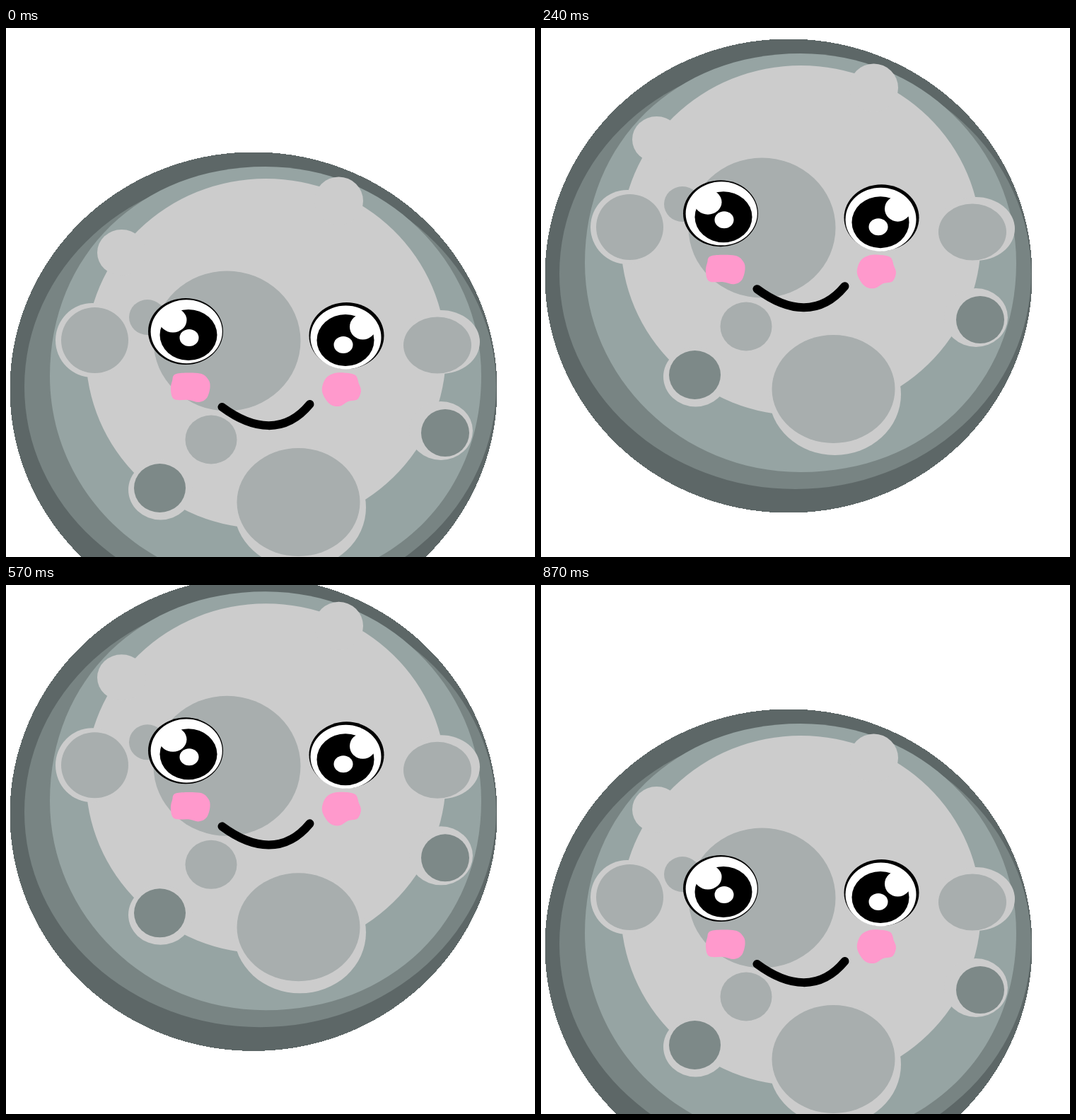
Write an HTML page with a canvas that moves like this. It is 748x748 px and loops after 900 ms.

```html
<!DOCTYPE html>
<html lang="en">
<head>
<meta charset="utf-8">
<title>Bouncing moon</title>
<style>
  html, body { margin: 0; width: 100%; height: 100%; overflow: hidden; background: #fff; }
  canvas { display: block; }
</style>
</head>
<body>
<canvas id="stage" width="748" height="748"></canvas>
<script>
const ctx = document.getElementById('stage').getContext('2d');
const SIZE = 748, STEP = 30, STEPS = 30, PEAK = 14;
const BODY_RISE = 280, FACE_RISE = 292;
const RIM = '#5d6767', SHADE = '#788483', GLOW = '#96a4a3';
const PALE = '#cccccc', CRATER = '#a8aeae', DEEP = '#7d8988', PINK = '#ff99cc';

function oval(color, x, y, rx, ry = rx) {
  ctx.fillStyle = color;
  ctx.beginPath();
  ctx.ellipse(x, y, rx, ry, 0, 0, Math.PI * 2);
  ctx.fill();
}

// Oval built from whole pixel rows, so its edge stays hard
function hardOval(color, x, y, rx, ry) {
  ctx.fillStyle = color;
  const bottom = Math.min(SIZE, Math.ceil(y + ry));
  for (let row = Math.max(0, Math.floor(y - ry)); row < bottom; row++) {
    const nearest = Math.min(Math.max(y, row), row + 1);
    const half = rx * Math.sqrt(Math.max(0, 1 - ((nearest - y) / ry) ** 2));
    const left = Math.floor(x - half);
    ctx.fillRect(left, row, Math.ceil(x + half) - left, 1);
  }
}

// Closed curve passing smoothly through the points
function blob(color, points) {
  const n = points.length, at = i => points[(i + n) % n];
  ctx.fillStyle = color;
  ctx.beginPath();
  ctx.moveTo(...points[0]);
  for (let i = 0; i < n; i++) {
    const [a, b, c, d] = [at(i - 1), at(i), at(i + 1), at(i + 2)];
    ctx.bezierCurveTo(
      b[0] + (c[0] - a[0]) / 6, b[1] + (c[1] - a[1]) / 6,
      c[0] - (d[0] - b[0]) / 6, c[1] - (d[1] - b[1]) / 6, c[0], c[1]);
  }
  ctx.fill();
}

// Oval whose upper left and lower right quarters are slightly fuller
function glow(x, y, rx, ry) {
  const k = 0.5523, f = 0.58;
  ctx.fillStyle = GLOW;
  ctx.beginPath();
  ctx.moveTo(x, y - ry);
  ctx.bezierCurveTo(x + k * rx, y - ry, x + rx, y - k * ry, x + rx, y);
  ctx.bezierCurveTo(x + rx, y + f * ry, x + f * rx, y + ry, x, y + ry);
  ctx.bezierCurveTo(x - k * rx, y + ry, x - rx, y + k * ry, x - rx, y);
  ctx.bezierCurveTo(x - rx, y - f * ry, x - f * rx, y - ry, x, y - ry);
  ctx.fill();
}

function drawMoon() {
  oval(SHADE, 359.5, 347.5, 333.5, 304.5);
  glow(367, 332, 305, 296);

  oval(PALE, 367.5, 300.5, 254.5, 247.5);
  oval(PALE, 470.5, 84.5, 34.5, 34);
  oval(PALE, 163.5, 157.5, 34.5, 32.5);
  oval(PALE, 122, 281.5, 52, 52.5);
  oval(PALE, 615, 284, 55, 45);
  oval(PALE, 615, 409.5, 45, 41.5);
  oval(PALE, 415.5, 518, 93.5, 86);
  oval(PALE, 218.5, 493, 45.5, 42.5);

  oval(CRATER, 312.5, 282.5, 104, 99);
  oval(CRATER, 200, 249, 26, 25);
  oval(CRATER, 125.5, 281.5, 47.5, 46.5);
  oval(CRATER, 610, 288.5, 48, 40);
  oval(CRATER, 290, 422, 36.5, 34.5);
  oval(CRATER, 413.5, 510.5, 87, 76.5);
  oval(DEEP, 217.5, 490.5, 36.5, 34.5);
  oval(DEEP, 621, 412.5, 34, 33.5);
}

function drawFace() {
  oval('#000', 254, 429, 53, 47);
  oval('#fff', 255.2, 429.2, 50.6, 45);
  oval('#000', 258, 434, 40.5, 36);
  oval('#fff', 236, 413, 19.5, 17.5);
  oval('#fff', 259, 438, 13.5, 12);

  oval('#000', 481.5, 435, 53, 47);
  oval('#fff', 480.5, 437.5, 50, 45);
  oval('#000', 480, 441.5, 40.5, 36.5);
  oval('#fff', 504.5, 422.5, 18.5, 18);
  oval('#fff', 477, 448, 13.5, 12);

  blob(PINK, [[241, 489], [274, 488.5], [286, 497], [288.5, 508], [284, 523],
    [273, 529], [258, 526], [238, 525], [233, 512], [235, 499]]);
  blob(PINK, [[478, 487.5], [494, 491], [499, 503], [502, 513], [497, 525],
    [484, 528], [471, 535], [457, 531], [447, 514], [451, 497], [462, 489]]);

  ctx.strokeStyle = '#000';
  ctx.lineWidth = 12;
  ctx.lineCap = 'round';
  ctx.beginPath();
  ctx.moveTo(305.5, 536);
  ctx.bezierCurveTo(350, 569, 395, 574, 429.5, 532);
  ctx.stroke();
}

function drawShifted(y, draw) {
  ctx.save();
  ctx.translate(0, y);
  draw();
  ctx.restore();
}

function render(time) {
  const step = Math.floor(time / STEP) % STEPS;
  const lift = step <= PEAK ? step / PEAK : (STEPS - 1 - step) / (STEPS - 1 - PEAK);
  const bodyY = 160 - BODY_RISE * lift;
  ctx.fillStyle = '#fff';
  ctx.fillRect(0, 0, SIZE, SIZE);
  hardOval(RIM, 350, 350.5 + bodyY, 344, 334.5);
  drawShifted(bodyY, drawMoon);
  drawShifted(-FACE_RISE * lift, drawFace);
}

let start;
function tick(now) {
  start ??= now;
  render(Math.max(0, now - start));
  requestAnimationFrame(tick);
}
render(0);
requestAnimationFrame(tick);
</script>
</body>
</html>
```
